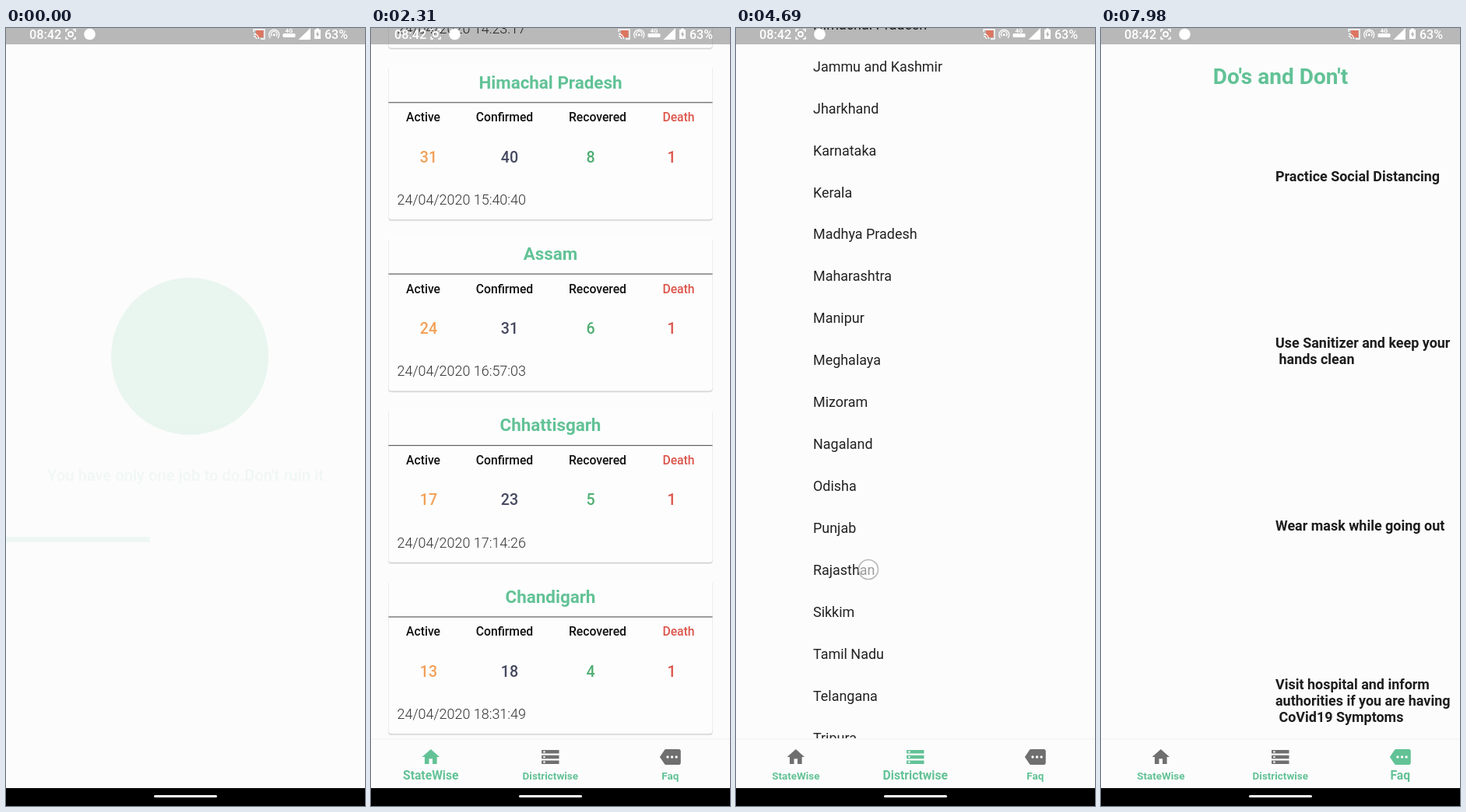
Write an HTML page that moves like this. It is 461 px wide and 1000 px high and loops after 8 s.

```html
<!DOCTYPE html>
<html lang="en">
<head>
<meta charset="utf-8">
<style>
html, body { margin: 0; width: 100%; height: 100%; overflow: hidden; background: #fcfcfc; }
svg { display: block; width: 100vw; height: 100vh; font-family: Roboto, sans-serif; }
text { white-space: pre; }
</style>
</head>
<body>
<svg id="stage" viewBox="0 0 461 1000"></svg>
<script>
const LOOP = 8000;
const GREEN = '#62c296', PAGE = '#fcfcfc', GREY = '#6f6f6f';
const NS = 'http://www.w3.org/2000/svg';
const stage = document.getElementById('stage');

function el(parent, tag, attrs = {}) {
  const node = document.createElementNS(NS, tag);
  for (const k in attrs) node.setAttribute(k, attrs[k]);
  parent.appendChild(node);
  return node;
}
const group = (parent, attrs) => el(parent, 'g', attrs);
const rect = (parent, x, y, width, height, fill, more) =>
  el(parent, 'rect', { x, y, width, height, fill, ...more });
const path = (parent, d, more) => el(parent, 'path', { d, ...more });

// y is the middle of the capital letters
function label(parent, str, x, y, size, fill, weight = 400, anchor = 'middle') {
  const node = el(parent, 'text', {
    x, y: y + size * 0.355, fill, 'font-size': size, 'font-weight': weight, 'text-anchor': anchor
  });
  node.textContent = str;
  return node;
}
function icon(parent, d, x, y, scale, fill) {
  return path(parent, d, {
    fill, 'fill-rule': 'evenodd',
    transform: `translate(${x} ${y}) scale(${scale}) translate(-12 -12)`
  });
}
const line = (parent, d, stroke, width = 1.5) =>
  path(parent, d, { fill: 'none', stroke, 'stroke-width': width });
const show = (node, on) => node.setAttribute('display', on ? 'inline' : 'none');
const move = (node, x, y) => node.setAttribute('transform', `translate(${x} ${y})`);
const clamp = v => Math.min(1, Math.max(0, v));
const span = (t, a, b) => clamp((t - a) / (b - a));
const easeOut = p => 1 - (1 - p) ** 3;
const smooth = p => p * p * (3 - 2 * p);

function bezier(x1, y1, x2, y2) {
  const f = (a, b, s) => 3 * (1 - s) ** 2 * s * a + 3 * (1 - s) * s * s * b + s ** 3;
  return x => {
    if (x <= 0 || x >= 1) return clamp(x);
    let lo = 0, hi = 1;
    for (let i = 0; i < 24; i++) {
      const mid = (lo + hi) / 2;
      if (f(x1, x2, mid) < x) lo = mid; else hi = mid;
    }
    return f(y1, y2, lo);
  };
}

/* Splash */
rect(stage, 0, 0, 461, 1000, PAGE);
const splash = group(stage);
el(splash, 'circle', { cx: 236, cy: 422, r: 101, fill: '#05a655' });
label(splash, "You have only one job to do.Don't ruin it", 230.5, 574.5, 20.2, GREEN, 500);
rect(splash, 0, 654, 461, 7, GREEN);
const gaps = [0, 1].map(() => rect(splash, 0, 653.5, 0, 8, '#fefefe'));
const head1 = bezier(.2, 0, .8, 1), tail1 = bezier(.4, 0, 1, 1);
const head2 = bezier(0, 0, .65, 1), tail2 = bezier(.1, 0, .45, 1);

function drawBar(t) {
  const p = (758 + t * 1.019) % 1800;
  const ends = [
    [tail1((p - 333) / 750), head1(p / 750)],
    [tail2((p - 1267) / 533), head2((p - 1000) / 567)]
  ];
  ends.forEach(([a, b], i) => {
    gaps[i].setAttribute('x', a * 461);
    gaps[i].setAttribute('width', Math.max(0, b - a) * 461);
  });
}

/* Cards */
const TINTS = ['#f2a057', '#45495f', '#4fae73', '#dc544a'];
const HEADS = ['Active', 'Confirmed', 'Recovered', 'Death'];

function card(parent, x, w, h, headXs) {
  const g = group(parent);
  rect(g, x - .5, 3, w + 1, h - 1, '#ececec', { rx: 4 });
  rect(g, x, 2, w, h - 1, '#c9c9c9', { rx: 4 });
  rect(g, x, 0, w, h, '#fdfdfd', { rx: 4 });
  rect(g, x, 48, w, 1.2, '#606060');
  HEADS.forEach((s, i) => label(g, s, headXs[i], 67.5, 15.7, i === 3 ? TINTS[3] : '#111', 500));
  return g;
}
function values(g, x, w, nums, y) {
  return nums.map((n, i) => label(g, n, x + w * (i + .5) / 4, y, 19.6, TINTS[i], 500));
}

/* State list */
const PITCH = 220.4;
const home = group(stage);
const homeList = group(home);
const ranked = ('Total,Maharashtra,Gujarat,Delhi,Rajasthan,Madhya Pradesh,Tamil Nadu,Uttar Pradesh,Telangana,' +
  'Andhra Pradesh,West Bengal,Kerala,Karnataka,Jammu and Kashmir,Punjab,Haryana,Bihar,Odisha,Jharkhand,' +
  'Uttarakhand,Himachal Pradesh,Assam,Chhattisgarh,Chandigarh,Andaman and Nicobar Islands,Ladakh,Meghalaya,' +
  'Puducherry,Goa,Manipur,Tripura,Mizoram,Arunachal Pradesh,Nagaland,Dadra and Nagar Haveli,Daman and Diu,' +
  'Lakshadweep,Sikkim').split(',');
const smallCounts = { Tripura: [0, 2, 2, 0], Mizoram: [1, 1, 0, 0], 'Arunachal Pradesh': [0, 1, 1, 0] };
const stamps = {
  Tripura: '23/04/2020 20:47:41', Mizoram: '26/03/2020 07:19:29',
  'Arunachal Pradesh': '16/04/2020 19:33:11', Nagaland: '20/04/2020 08:45:07'
};
const two = n => String(n % 60).padStart(2, '0');

function counts(name, i) {
  if (smallCounts[name]) return smallCounts[name];
  if (i > 30) return [0, 0, 0, 0];
  const all = Math.round((i ? 6800 : 28500) * Math.exp(-.27 * Math.max(0, i - 1)));
  const well = Math.round(all * .2), dead = Math.round(all * .03);
  return [all - well - dead, all, well, dead];
}
ranked.forEach((name, i) => {
  const g = card(homeList, 22.5, 416, 199, [67, 171.5, 291, 395]);
  move(g, 0, i * PITCH);
  label(g, name, 230.5, 22.5, 22.4, GREEN, 700);
  values(g, 22, 416, counts(name, i), 118.5);
  const stamp = stamps[name] || `24/04/2020 ${two(8 + i % 13)}:${two(i * 17)}:${two(i * 23)}`;
  label(g, stamp, 33.5, 173.5, 17.95, '#333', 300, 'start');
});

/* District page */
const district = group(stage);
label(district, 'DistrictWise Data', 230.5, 59, 24.7, GREEN);
const choice = label(district, '', 99, 123, 17.95, '#222', 400, 'start');
icon(district, 'M20 12l-1.41-1.41L13 16.17V4h-2v12.17l-5.58-5.59L4 12l8 8 8-8z', 351, 123, 1.02, GREEN);
const field = rect(district, 91, 173.5, 279, 52.5, 'none', { rx: 5, 'stroke-width': 1.2 });
const hint = label(district, 'Enter District Name', 107.5, 198.5, 17.95, '#777', 400, 'start');
const typed = label(district, '', 107.5, 198.5, 17.95, '#222', 400, 'start');
typed.setAttribute('text-decoration', 'underline');
const caret = rect(district, 167, 188, 2, 21, '#3d9a70');
const result = card(district, 63, 336, 201, [97, 181.5, 281, 365]);
move(result, 0, 277);
const resultName = label(result, '', 230.5, 24, 22.4, GREEN, 700);
const resultNums = values(result, 63, 336, [4, 4, 0, 0], 120);

const menu = group(stage);
rect(menu, 0, 21, 461, 894, PAGE);
const menuList = group(menu);
('Andhra Pradesh,Arunachal Pradesh,Assam,Bihar,Chhattisgarh,Goa,Gujarat,Haryana,Himachal Pradesh,' +
  'Jammu and Kashmir,Jharkhand,Karnataka,Kerala,Madhya Pradesh,Maharashtra,Manipur,Meghalaya,Mizoram,' +
  'Nagaland,Odisha,Punjab,Rajasthan,Sikkim,Tamil Nadu,Telangana,Tripura,Uttar Pradesh,Uttarakhand,West Bengal')
  .split(',').forEach((s, i) => label(menuList, s, 99, 84 + i * 53.93, 17.95, '#222', 400, 'start'));

/* Advice page */
const faq = group(stage);
label(faq, "Do's and Don't", 230.5, 62, 28, GREEN, 700);
[
  [190.5, 'Practice Social Distancing'],
  [404.5, 'Use Sanitizer and keep your', ' hands clean'],
  [639.5, 'Wear mask while going out'],
  [843.5, 'Visit hospital and inform', 'authorities if you are having', ' CoVid19 Symptoms']
].forEach(([y, ...rows]) => rows.forEach((s, i) =>
  label(faq, s, 224, y + i * 21.2, 17.95, '#1d1d1d', 700, 'start')));

/* Bottom tabs */
const nav = group(stage);
rect(nav, 0, 913, 461, 2, '#f5f5f5');
rect(nav, 0, 914.5, 461, 63, PAGE);
const dot = x => `M${x} 13.5a1.5 1.5 0 1 1 .01 0z`;
const tabs = [
  ['StateWise', 76.8, 'M10 20v-6h4v6h5v-8h3L12 3 2 12h3v8z'],
  ['Districtwise', 230.3, 'M2 20h20v-4H2v4zm2-3h2v2H4v-2zM2 4v4h20V4H2zm4 3H4V5h2v2zm-4 7h20v-4H2v4zm2-3h2v2H4v-2z'],
  ['Faq', 384.3, 'M22 3H7c-.69 0-1.23.35-1.59.88L0 12l5.41 8.11c.36.53.97.89 1.66.89H22c1.1 0 2-.9 2-2V5c0-1.1-.9-2-2-2z' +
    dot(9) + dot(14) + dot(19)]
].map(([s, x, d]) => ({
  mark: icon(nav, d, x, 937, 1.12, GREY),
  text: label(nav, s, x, 961, 13.45, GREEN, 700)
}));
function pickTab(n) {
  tabs.forEach(({ mark, text }, i) => {
    mark.setAttribute('fill', i === n ? GREEN : GREY);
    text.setAttribute('font-size', i === n ? 15.7 : 13.45);
  });
}

/* Keyboard */
rect(stage, 0, 977, 461, 23, '#000');
const keys = group(stage);
rect(keys, 0, 624, 461, 376, '#000');
rect(keys, 0, 624, 461, 50, '#373939');
el(keys, 'circle', { cx: 28, cy: 649, r: 17, fill: '#fff' });
line(keys, 'M25 643.5l5.5 5.5-5.5 5.5', '#444', 1.8);
rect(keys, 161.5, 636, 1, 26, '#515353');
rect(keys, 296.5, 636, 1, 26, '#515353');
const tips = [[102, 400], [229, 700], [356.5, 400]].map(([x, w]) =>
  label(keys, '', x, 650, 20, w === 700 ? '#fff' : '#cfd1d1', w));
rect(keys, 434.5, 638.5, 7, 13, '#a9abab', { rx: 3.5 });
line(keys, 'M431.5 647.5a6.7 6.7 0 0 0 13.4 0M438 654.5v5', '#a9abab', 1.8);
[['qwertyuiop', 26, 707], ['asdfghjkl', 48, 772], ['zxcvbnm', 93, 839]].forEach(([row, x, y], r) =>
  [...row].forEach((c, i) => {
    label(keys, c, x + i * 45.65, y, 29, '#f4f4f4');
    if (!r) label(keys, (i + 1) % 10, 38.5 + i * 45.75, 691, 12, '#b5b5b5', 500);
  }));
line(keys, 'M36 829l12 12h-6v9h-12v-9h-6z', '#b8b8b8', 1.8);
line(keys, 'M411 840.5l8-10h18.5v20H419zM423 836l9 9m0-9l-9 9', '#b8b8b8', 1.8);
label(keys, '?123', 36, 904, 20, '#b8b8b8', 500);
el(keys, 'circle', { cx: 93, cy: 894, r: 5.7, fill: 'none', stroke: '#b8b8b8' });
line(keys, 'M90 895.5q3 3.5 6 0M91 891v1.6M95 891v1.6', '#b8b8b8', 1);
label(keys, ',', 93.5, 906, 24, '#ddd');
line(keys, 'M150 904a11.2 11.2 0 1 1-22.4 0a11.2 11.2 0 1 1 22.4 0M127.6 904h22.4M129 898.5h19.5M129 909.5h19.5' +
  'M138.8 893q-9.5 11 0 22q9.5-11 0-22', '#b8b8b8', 1.4);
rect(keys, 173, 888, 161, 32.5, '#747474', { rx: 4 });
label(keys, 'English', 253, 904.5, 14.6, '#fff');
label(keys, '.', 367.5, 904, 25, '#ddd');
rect(keys, 396.5, 885, 56, 37, '#84cbc4', { rx: 8 });
line(keys, 'M415.5 904.5l6 6 12.5-12.5', '#fff', 2.2);
line(keys, 'M26.5 966l5 5 5-5', '#eee', 1.8);
rect(stage, 190, 986, 81, 3, '#fff', { rx: 1.5 });

/* Status bar */
const bar = group(stage);
rect(bar, 0, 0, 461, 21, '#000', { opacity: .27 });
label(bar, '08:42', 30, 8.5, 16.3, '#fff', 500, 'start');
line(bar, 'M77 5V2h3M86 2h3v3M89 11v3h-3M80 14h-3v-3', '#fff');
el(bar, 'circle', { cx: 83, cy: 8, r: 3, fill: 'none', stroke: '#fff', 'stroke-width': 1.8 });
el(bar, 'circle', { cx: 107.5, cy: 8, r: 7.3, fill: '#fff' });
rect(bar, 321, 3, 9.5, 9, '#de7560');
line(bar, 'M318 5V2h14v12h-5M318 7.5a6.5 6.5 0 0 1 6.5 6.5M318 10.5a3.5 3.5 0 0 1 3.5 3.5', '#fff', 1.3);
line(bar, 'M339.5 13a6.5 6.5 0 1 1 9.5 0M341.5 10.5a3.7 3.7 0 1 1 5.5 0', '#fff', 1.3);
el(bar, 'circle', { cx: 344.2, cy: 8.7, r: 1.5, fill: '#fff' });
label(bar, '4G', 363.5, 3, 8, '#fff', 700);
rect(bar, 355.5, 7, 16, 5, '#fff', { rx: 1.5 });
path(bar, 'M375.5 15L391 0v15z', { fill: '#fff' });
path(bar, 'M396 2h2.3V.5h3.4V2h2.3v12h-8z', { fill: '#fff' });
path(bar, 'M400.5 4l-2.5 4.5h1.6V12l2.6-4.5h-1.7z', { fill: '#aaa' });
label(bar, '63%', 409, 8.5, 16, '#fff', 500, 'start');

/* Touch ring: start, end, x, y, end y */
const ring = el(stage, 'circle', {
  r: 12.5, fill: '#fff', 'fill-opacity': .55, stroke: '#b9b9b9', 'stroke-width': 1.6
});
const touches = [
  [3250, 3350, 230, 940, 940],
  [3530, 3630, 300, 123, 123],
  [3880, 4180, 305, 806, 470],
  [4640, 4750, 170, 696, 696],
  [5400, 5530, 151, 201, 201],
  [7580, 7690, 384, 940, 940]
];

const WORD = 'udaiput';
function entry(t) {
  if (t >= 7110) return 'udaipur';
  if (t >= 6960) return 'udaipu';
  return WORD.slice(0, Math.floor(clamp((t - 5880) / 700) * 7));
}

function drawDistrict(t) {
  choice.textContent = t < 4750 ? 'Select State' : 'Rajasthan';
  choice.setAttribute('fill', t < 4750 ? '#777' : '#222');
  const focus = t > 5530;
  const text = entry(t);
  const cap = text.charAt(0).toUpperCase() + text.slice(1);
  const open = focus && t < 7420;
  field.setAttribute('stroke', open ? '#6fb596' : '#959595');
  typed.textContent = text;
  typed.setAttribute('text-decoration', open ? 'underline' : 'none');
  show(hint, !text);
  show(caret, open);
  if (open) caret.setAttribute('x', 107.5 + (text ? typed.getComputedTextLength() : 0));
  show(result, text);
  resultName.textContent = cap;
  resultNums.forEach(n => show(n, text === 'udaipur'));
  const long = text.length > 2;
  const words = long ? [text, 'Udaipur', 'udaipur'] : [text, cap, ''];
  tips.forEach((n, i) => { n.textContent = words[i]; });

  const menuOn = t >= 3630 && t < 4830;
  show(menu, menuOn);
  menu.setAttribute('opacity', Math.min(span(t, 3610, 3780), 1 - span(t, 4750, 4830)));
  move(menuList, 0, -336 * smooth(span(t, 3930, 4180)) - 184 * easeOut(span(t, 4160, 4560)));
}

function render(t) {
  const page = t < 1920 ? 0 : t < 3330 ? 1 : t < 7690 ? 2 : 3;
  [splash, home, district, faq].forEach((g, i) => show(g, i === page));
  show(menu, false);
  show(nav, page > 0);
  pickTab(page - 1);
  if (page === 0) {
    splash.setAttribute('opacity', .07 + .93 * span(t, 0, 280));
    drawBar(t);
  }
  if (page === 1) move(homeList, 0, 44 - 6763 * easeOut(span(t, 2080, 2860)));
  if (page === 2) drawDistrict(t);

  const up = easeOut(span(t, 5600, 5820)) - smooth(span(t, 7300, 7470));
  show(keys, up > 0);
  move(keys, 0, (1 - up) * 376);

  const touch = touches.find(([a, b]) => t >= a && t < b);
  show(ring, touch);
  if (touch) {
    const [a, b, x, y0, y1] = touch;
    ring.setAttribute('cx', x);
    ring.setAttribute('cy', y0 + (y1 - y0) * smooth(span(t, a + 50, b)));
  }
}

const start = performance.now();
function tick() {
  render((performance.now() - start) % LOOP);
  requestAnimationFrame(tick);
}
render(0);
tick();
</script>
</body>
</html>
```
